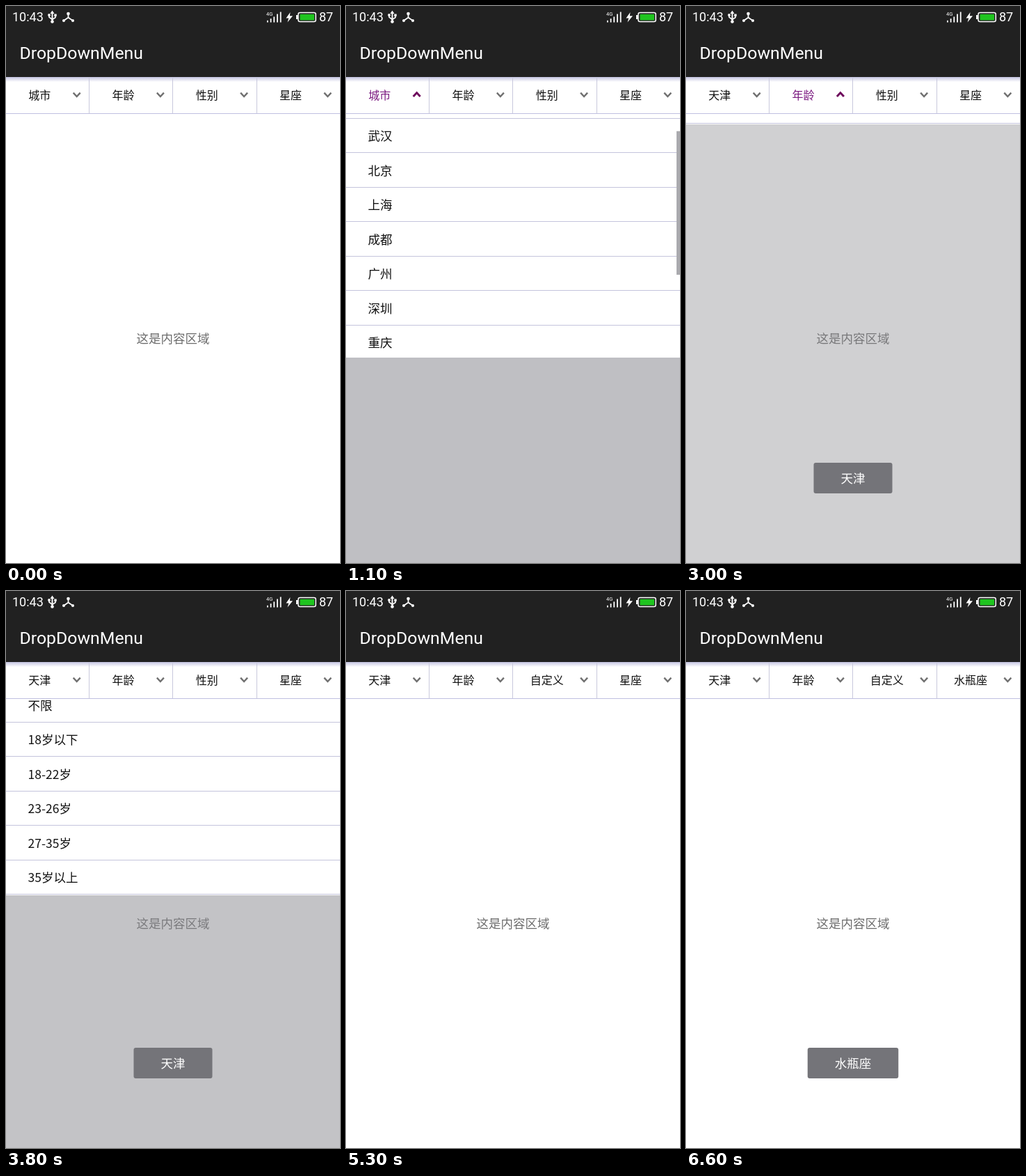
Recreate the animation shown at these times as an HTML page with a canvas. Size 480x800 px, loop 6.7 s.

```html
<!DOCTYPE html>
<html lang="zh">
<head>
<meta charset="utf-8">
<title>DropDownMenu</title>
<style>
html, body { margin: 0; width: 100%; height: 100%; overflow: hidden; background: #fff; }
canvas { display: block; width: 100vw; height: 100vh; }
</style>
</head>
<body>
<canvas id="stage" width="480" height="800"></canvas>
<script>
const ctx = document.getElementById('stage').getContext('2d');
const W = 480, H = 800, LOOP = 6700, STEP = 100;
const BAR_H = 102, TOP = 155, ROW = 49.5, LIST_H = 350, SLIDE = 350;
const BAR = '#212121', LINE = '#c4c4dc', ACCENT = '#7b1a80', MASK = '136,136,143';
const LATIN = 'Roboto, sans-serif';
const HAN = '"Noto Sans CJK SC", "Noto Sans CJK", "Noto Sans CJK JP", sans-serif';

const cities = '不限 武汉 北京 上海 成都 广州 深圳 重庆 天津 西安 南京 杭州'.split(' ');
const ages = '不限 18岁以下 18-22岁 23-26岁 27-35岁 35岁以上'.split(' ');
const signs = ('不限 白羊座 金牛座 双子座 巨蟹座 狮子座 处女座 天秤座 ' +
  '天蝎座 射手座 摩羯座 水瓶座 双鱼座').split(' ');

// tap: tab lights up; open and close: panel slides; off: tab is released
const menus = [
  { label: '城市', picked: '天津', tap: 100, open: 250, off: 1800, close: 1900, height: LIST_H, draw: drawCities },
  { label: '年龄', picked: '年龄', tap: 2800, open: 2950, off: 3600, close: 3750, height: ages.length * ROW, draw: () => drawRows(ages) },
  { label: '性别', picked: '自定义', tap: 4300, open: 4353, off: 4900, close: 4900, height: LIST_H, draw: drawCustom },
  { label: '星座', picked: '水瓶座', tap: 5500, open: 5600, off: 6100, close: 6200, height: 4 * 56, draw: drawSigns }
];

const toasts = [
  { text: '天津', from: 2350, full: 2500, fade: 4200, gone: 4400 },
  { text: '水瓶座', from: 6450, full: 6600, fade: LOOP, gone: LOOP + 1 }
];

const span = (t, a, b) => Math.min(1, Math.max(0, (t - a) / (b - a)));
const ease = u => (1 - Math.cos(Math.PI * u)) / 2;
const smooth = u => u * u * (3 - 2 * u);

function rect(x, y, w, h, color) {
  ctx.fillStyle = color;
  ctx.fillRect(x, y, w, h);
}

function text(str, x, y, size, color, font = HAN, align = 'left') {
  ctx.font = size + 'px ' + font;
  ctx.textAlign = align;
  ctx.fillStyle = color;
  ctx.fillText(str, x, y);
}

// Chinese text placed by its vertical middle
function han(str, x, mid, size, color, align) {
  text(str, x, Math.round(mid + size * 0.36), size, color, HAN, align);
}

function line(points, color, width) {
  ctx.beginPath();
  points.forEach(([x, y], i) => i ? ctx.lineTo(x, y) : ctx.moveTo(x, y));
  ctx.strokeStyle = color;
  ctx.lineWidth = width;
  ctx.stroke();
}

function shape(points, color) {
  ctx.beginPath();
  points.forEach(([x, y]) => ctx.lineTo(x, y));
  ctx.fillStyle = color;
  ctx.fill();
}

function dot(x, y, r, color) {
  ctx.beginPath();
  ctx.arc(x, y, r, 0, 7);
  ctx.fillStyle = color;
  ctx.fill();
}

function box(x, y, w, h, r) {
  ctx.beginPath();
  ctx.roundRect(x, y, w, h, r);
}

function drawStatus() {
  const c = '#fff';
  text('10:43', 9, 22, 18, c, LATIN);
  text('87', 450, 22, 18, c, LATIN);

  // usb
  line([[66.5, 9], [66.5, 22]], c, 2);
  shape([[63.5, 11], [66.5, 6.5], [69.5, 11]], c);
  line([[62, 13], [62, 16], [66.5, 19.5], [71, 16.5], [71, 13]], c, 1.6);
  dot(62, 13, 1.9, c);
  rect(69.3, 11.5, 3.4, 3.4, c);
  dot(66.5, 22.5, 2.3, c);

  // three linked nodes
  line([[89.5, 11], [89.5, 16.5], [83, 21]], c, 1.8);
  line([[89.5, 16.5], [96, 21]], c, 1.8);
  dot(89.5, 11, 2.3, c);
  dot(83, 21, 2, c);
  dot(96, 21, 2, c);

  // signal
  text('4G', 374, 14, 7.5, c, LATIN);
  [3, 6, 9, 12, 15].forEach((h, i) => {
    const tall = i < 3 ? h * 0.9 : h;
    rect(375 + i * 4.7, 23.5 - tall, 1.8, tall, c);
  });

  // charge and battery
  shape([[408.5, 9], [402.5, 17.5], [406.3, 17.5], [404.5, 23.5], [412, 14.2], [407.8, 14.2]], c);
  ctx.strokeStyle = c;
  ctx.lineWidth = 1.5;
  box(420, 9.5, 25.2, 13, 2.5);
  ctx.stroke();
  rect(417, 13, 2.5, 6, c);
  rect(422.5, 11.8, 20.5, 8.6, '#1fc41f');
}

function drawTabs(t) {
  rect(0, BAR_H, W, TOP - BAR_H, '#fff');
  const shade = ctx.createLinearGradient(0, BAR_H, 0, 109);
  shade.addColorStop(0, '#c4c4e2');
  shade.addColorStop(1, '#fff');
  rect(0, BAR_H, W, 7, shade);

  menus.forEach((m, i) => {
    const x = i * 120.2, on = t >= m.tap && t < m.off;
    han(t >= m.off ? m.picked : m.label, x + 48.3, 128, 16, on ? ACCENT : '#111', 'center');
    const tip = on ? -2.7 : 2.7, cx = x + 101.7;
    line([[cx - 5, 127.3 - tip], [cx, 127.3 + tip], [cx + 5, 127.3 - tip]],
      on ? '#6e0a5c' : '#707070', on ? 3 : 2.4);
    if (i) rect(Math.round(x) - 1, 103, 1, 51, '#c8c8dc');
  });
  rect(0, 154, W, 1, '#c0c0e0');
}

function drawRows(items) {
  items.forEach((item, i) => {
    han(item, 31.5, (i + 0.5) * ROW - 0.5, 17.5, '#111');
    rect(0, Math.round((i + 1) * ROW) - 2, W, 1, LINE);
  });
}

function drawCities(t) {
  const full = cities.length * ROW;
  const scroll = Math.round((full - LIST_H) * smooth(span(t, 921, 1600)));
  ctx.save();
  ctx.beginPath();
  ctx.rect(0, 0, W, LIST_H);
  ctx.clip();
  ctx.translate(0, -scroll);
  drawRows(cities);
  ctx.restore();
  if (t > 921) {
    ctx.globalAlpha = 1 - span(t, 1650, 1850);
    rect(475, scroll * LIST_H / full, 5, LIST_H * LIST_H / full, '#aaaaae');
    ctx.globalAlpha = 1;
  }
}

function drawCustom() {
  han('自定义', W / 2, LIST_H / 2, 17.5, '#111', 'center');
}

function drawSigns() {
  signs.forEach((s, i) => {
    han(s, 60 + (i % 4) * 120, 28 + Math.floor(i / 4) * 56, 16, '#111', 'center');
  });
}

function drawMenu(m, t) {
  const end = m.close + SLIDE;
  if (t < m.tap || t >= end) return;
  const out = 1 - ease(span(t, m.close, end));
  const shown = ease(span(t, m.open, m.open + SLIDE)) * out;
  const dim = 0.533 * span(t, m.tap, m.tap + 270) * out;

  ctx.save();
  ctx.beginPath();
  ctx.rect(0, TOP, W, H - TOP);
  ctx.clip();
  rect(0, TOP, W, H - TOP, `rgba(${MASK},${dim})`);
  ctx.translate(0, Math.round(TOP - m.height * (1 - shown)));
  rect(0, 0, W, m.height, '#fff');
  m.draw(t);
  ctx.restore();
}

function drawToast(o, t) {
  const alpha = span(t, o.from, o.full) * (1 - span(t, o.fade, o.gone));
  if (!alpha) return;
  const w = o.text.length * 17.5 + 78;
  ctx.globalAlpha = alpha;
  ctx.fillStyle = '#747479';
  box((W - w) / 2, 656, w, 44, 3);
  ctx.fill();
  han(o.text, W / 2, 678.5, 17.5, '#fff', 'center');
  ctx.globalAlpha = 1;
}

function draw(t) {
  rect(0, 0, W, H, '#fff');
  han('这是内容区域', W / 2, 478, 17.5, '#6c6c6c', 'center');
  menus.forEach(m => drawMenu(m, t));
  rect(0, 0, W, BAR_H, BAR);
  drawStatus();
  text('DropDownMenu', 19.5, 76, 24.8, '#fff', LATIN);
  drawTabs(t);
  toasts.forEach(o => drawToast(o, t));
}

const start = performance.now();
function tick() {
  const t = (performance.now() - start) % LOOP;
  draw(Math.floor(t / STEP) * STEP);
  requestAnimationFrame(tick);
}
tick();
</script>
</body>
</html>
```
